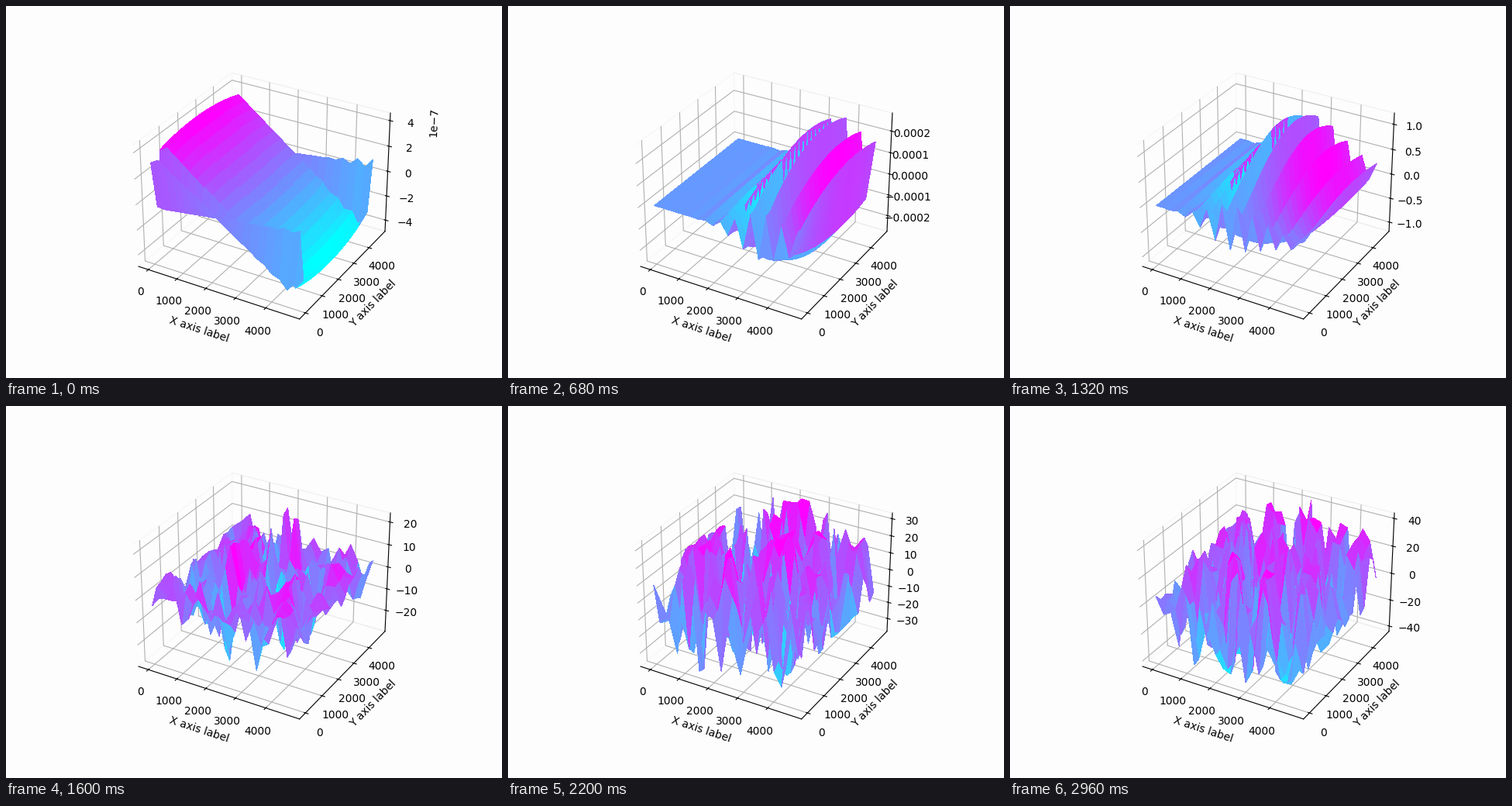
These frames come from a looping animation (640 px wide and 480 px high, 3 s). A matplotlib script:

```python
import numpy as np
import matplotlib.pyplot as plt
from matplotlib.animation import FuncAnimation

N, STEP = 20, 250
FRAMES, INTERVAL = 75, 40
CALM, BREAK = 17, 33  # ripples take over / waves start to break
GROWTH = 0.523
PAPER = "#fdfdfd"

i, j = np.meshgrid(np.arange(N), np.arange(N), indexing="ij")
X, Y = i * STEP, j * STEP

rng = np.random.default_rng(12)
modes = rng.normal(0, 1, (4, N, N))
modes[:, :, 1:] = 0.8 * modes[:, :, 1:] + 0.6 * modes[:, :, :-1]
speeds = rng.uniform(0.25, 0.7, 4)
phases = rng.uniform(0, 2 * np.pi, 4)


def smooth(t):
    t = np.clip(t, 0, 1)
    return t * t * (3 - 2 * t)


def slope(n):
    """Initial tilted sheet with one kinked row at each border."""
    along = np.clip((9.5 - i) / 8.5, -1, 1)
    along[[0, -1]] *= 0.9
    across = 0.78 + 0.22 * np.sin(np.pi * j / (N - 1)) ** 0.6
    across[:, [1, -1]] = -0.15
    return 4.4e-7 * (1 + 0.1 * n) * along * across


def ripples(n):
    """Growing two-cell zigzag that spreads towards small x."""
    t = n - CALM
    d = i - (14.3 - 0.26 * t)
    width = np.where(d < 0, 2.9, max(3.5 + 0.06 * t, 2.6))
    env = np.exp(-0.5 * (d / width) ** 2)
    env[-1] *= 1.5
    zigzag = env * np.where(i % 2, 1, -1)
    lift = 0.08 / (1 + np.exp(1.5 - d))
    hump = np.sin(np.pi * (j + 1) / 28) ** (0.6 + 0.035 * max(t, 0))
    hump[:, 0] = 0.38
    return 2.7e-4 * np.exp(GROWTH * t) * (zigzag + lift) * hump


def rough(n):
    """Choppy sea, calmer at both ends of x."""
    noise = np.tensordot(np.cos(speeds * n + phases), modes, 1)
    return np.tanh(0.7 * noise) * (0.5 + 0.5 * np.sin(np.pi * i / (N - 1)) ** 0.6)


def height(n):
    waves = ripples(n)
    if n <= BREAK:
        return waves + slope(n) * (1 - smooth((n - 4) / 14))
    mix = smooth((n - BREAK) / 11)
    z = (1 - mix) * waves / np.abs(waves).max() + mix * rough(n)
    grown = 1.2 * np.exp(GROWTH * (n - BREAK))
    crest, trough = 20 + 0.54 * (n - BREAK), 30 + 0.3 * (n - BREAK)
    top = crest * np.tanh(grown / crest)
    bottom = trough * np.tanh(grown / trough)
    return np.where(z > 0, z * top / z.max(), z * bottom / -z.min())


def padded(lo, hi, part=1 / 48):
    pad = (hi - lo) * part
    return lo - pad, hi + pad


fig = plt.figure(figsize=(6.4, 4.8), dpi=100, facecolor=PAPER)
ax = fig.add_subplot(projection="3d", facecolor=PAPER)
ax.set_xlabel("X axis label")
ax.set_ylabel("Y axis label")
for axis in (ax.xaxis, ax.yaxis, ax.zaxis):
    axis.pane.fill = False

span = padded(*padded(0, (N - 1) * STEP, 0.05))
ticks = range(0, 5000, 1000)
surface = None


def draw(n):
    global surface
    if surface is not None:
        surface.remove()
    z = height(n)
    surface = ax.plot_surface(X, Y, z, cmap="cool", linewidth=0, antialiased=False)
    ax.set(xlim=span, ylim=span, zlim=padded(z.min(), z.max()),
           xticks=ticks, yticks=ticks)
    return [surface]


anim = FuncAnimation(fig, draw, frames=FRAMES, init_func=lambda: [],
                     interval=INTERVAL, repeat=True, repeat_delay=0, blit=False)
plt.show()
```
